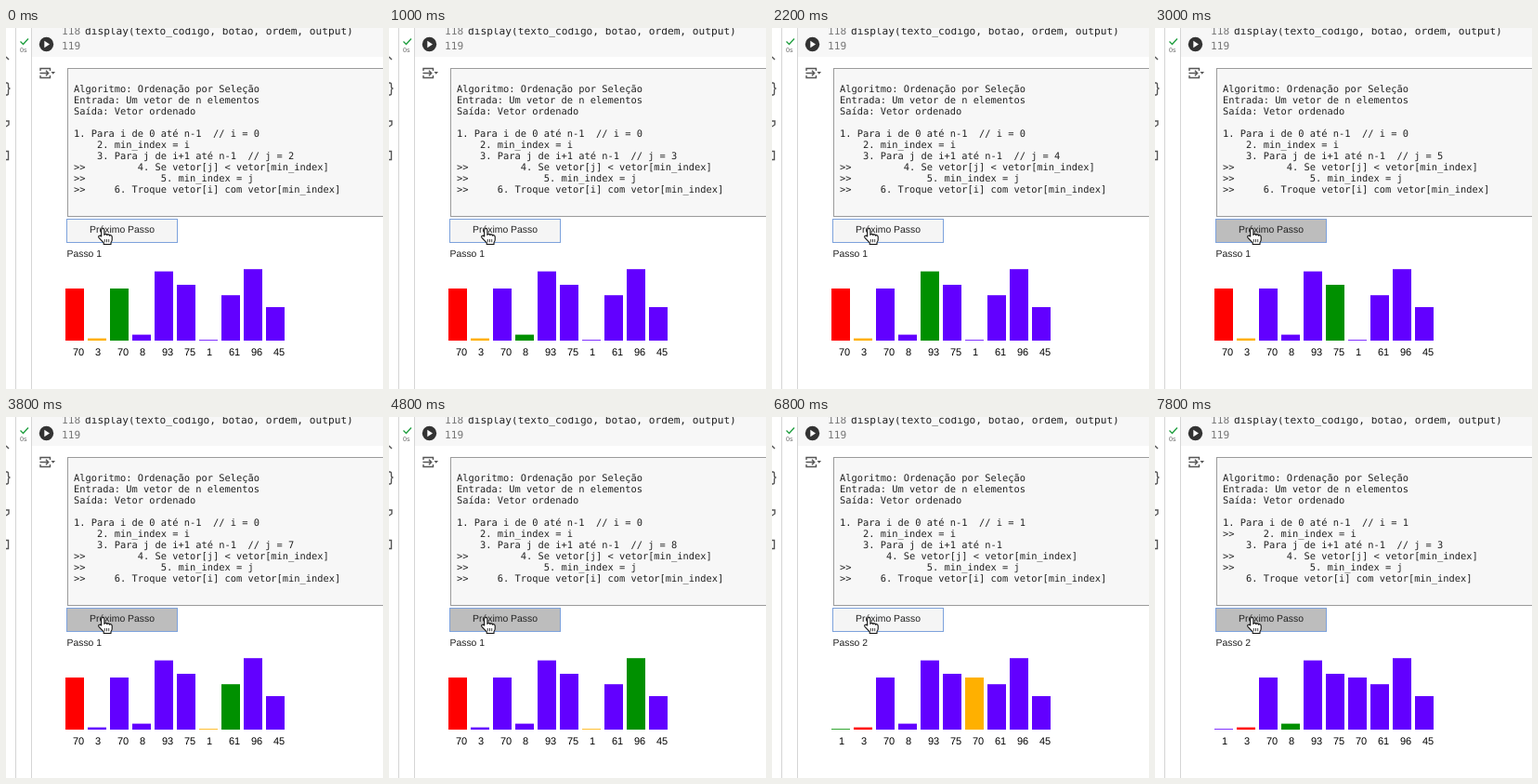
Recreate the animation shown at these times as an HTML page. Size 406 by 388 pixels, loop 8000 ms.

```html
<!DOCTYPE html>
<html lang="pt">
<head>
<meta charset="utf-8">
<title>Ordenação por Seleção</title>
<style>
  html, body { margin: 0; width: 100%; height: 100%; overflow: hidden; background: #fff; }
  svg { display: block; width: 406px; height: 388px; }
  text { white-space: pre; text-rendering: geometricPrecision; }
  .mono { font-family: "DejaVu Sans Mono", monospace; }
  .sans { font-family: "Liberation Sans", Arial, sans-serif; font-size: 10.4px; fill: #212121; }
  .algo { font-size: 10.38px; fill: #212121; }
  .code { font-size: 11.16px; fill: #212121; }
  .number { fill: #777; }
  .label { font-size: 11px; fill: #000; }
  .icon { fill: none; stroke: #555; stroke-width: 1.4; }
</style>
</head>
<body>
<svg viewBox="0 0 406 388">
  <rect x="28" width="378" height="31" fill="#f7f7f7"/>
  <path d="M10.5 0V388M27.5 0V388" stroke="#d5d5d5"/>

  <g class="icon">
    <path d="M0 31l3 3"/>
    <path d="M0 59h1q1.5 0 1.5 2v2q0 2 2 2q-2 0-2 2v3q0 2-1.500 2h-1"/>
    <path d="M0 100h3v4l-3 2"/>
    <path d="M0 132.500h2.500v9h-2.500"/>
  </g>

  <path d="M15.500 14.500l3 3 5.500-6" fill="none" stroke="#1e9e3e" stroke-width="1.3"/>
  <text class="sans" x="15" y="26" style="font-size:7px;fill:#666">0s</text>
  <circle cx="43.500" cy="17.500" r="7.700" fill="#333"/>
  <path d="M41.300 13.800v7.400l5.700-3.700z" fill="#fff"/>
  <text class="mono code number" x="60" y="7">118</text>
  <text class="mono code" x="85" y="7">display(texto_codigo, botao, ordem, output)</text>
  <text class="mono code number" x="60" y="23">119</text>

  <path class="icon" stroke-width="1.200" d="M37 46v-2.500h10.500v2.500M37 51v2.500h10.500v-2.500M36.500 48.500h9M43 45.800l2.700 2.700-2.700 2.700"/>
  <path d="M48.500 47h4.500l-2.250 2.800z" fill="#555"/>

  <rect x="66.500" y="43.500" width="350" height="159" fill="#f7f7f7" stroke="#9b9b9b"/>
  <g id="algo" class="mono algo"></g>

  <rect id="button" x="65.500" y="205.500" width="119" height="25" stroke="#7da2dc"/>
  <text class="sans" x="125" y="220" text-anchor="middle">Próximo Passo</text>
  <g id="output">
    <text id="step" class="sans" x="65.500" y="246"></text>
    <g id="chart"></g>
  </g>

  <path d="M102.700 217.200q0-1.700 1.600-1.700t1.600 1.700v5.300q.2-1.200 1.500-1.100t1.400 1.300q.3-1 1.500-.8t1.300 1.300q.4-.8 1.400-.5t1.200 1.600v3.200q0 1.700-1.200 3v2h-7.800v-1.700l-5-5.200q-1.100-1.500 0-2.200t2.500.6z"
    fill="#fff" stroke="#111" stroke-width="1.100" stroke-linejoin="round"/>
  <path d="M106.300 227v3.300M108.500 227v3.300M110.700 227v3.300" stroke="#111" stroke-width=".8"/>
</svg>

<script>
const LOOP = 8000;
const PURPLE = '#6200ff', GREEN = '#009000', ORANGE = '#ffb000', RED = '#ff0000';
const before = [70, 3, 70, 8, 93, 75, 1, 61, 96, 45];
const after = [1, 3, 70, 8, 93, 75, 70, 61, 96, 45];

// Times at which j reaches 2, 3, 4 ... in the first pass.
const states = [0, 1000, 1800, 2600, 3600, 3800, 4600, 5000, 5400].map((at, k) => ({
  at, i: 0, j: k + 2, min: k < 5 ? 1 : 6, marks: [4, 5, 6], values: before
}));
states.push(
  { at: 6800, i: 1, j: 0, min: 6, marks: [5, 6], values: after },
  { at: 7800, i: 1, j: 3, min: 1, marks: [2, 4, 5], values: after }
);
const presses = [
  [200, 400], [1200, 1400], [2000, 2200], [3000, 3200], [3400, 3600], [3800, 4200],
  [4400, 4600], [4800, 5000], [5200, 5600], [7000, 7200], [7800, 8000]
];
const cleared = [2600, 2800];

const $ = id => document.getElementById(id);
const within = (t, [from, to]) => t >= from && t < to;

function add(parent, tag, attrs) {
  const el = document.createElementNS('http://www.w3.org/2000/svg', tag);
  for (const key in attrs) el.setAttribute(key, attrs[key]);
  return parent.appendChild(el);
}

function algorithm({ i, j, marks }) {
  const steps = [
    `1. Para i de 0 até n-1  // i = ${i}`,
    '    2. min_index = i',
    '    3. Para j de i+1 até n-1' + (j ? `  // j = ${j}` : ''),
    '        4. Se vetor[j] < vetor[min_index]',
    '            5. min_index = j',
    '    6. Troque vetor[i] com vetor[min_index]'
  ].map((line, k) => (marks.includes(k + 1) ? '>> ' : '') + line);
  return ['Algoritmo: Ordenação por Seleção', 'Entrada: Um vetor de n elementos',
    'Saída: Vetor ordenado', '', ...steps];
}

const lines = Array.from({ length: 10 }, (_, k) =>
  add($('algo'), 'text', { x: 73, y: 69 + k * 12.05 }));
const bars = before.map((_, k) => ({
  rect: add($('chart'), 'rect', { x: 64 + 24 * k, width: 20 }),
  label: add($('chart'), 'text', { class: 'sans label', x: 72 + 24 * k, y: 352 })
}));

function show(state) {
  algorithm(state).forEach((line, k) => lines[k].textContent = line);
  $('step').textContent = `Passo ${state.i + 1}`;
  bars.forEach(({ rect, label }, k) => {
    const height = state.values[k] * 0.8;
    rect.setAttribute('y', 336 - height);
    rect.setAttribute('height', height);
    rect.setAttribute('fill',
      k === state.i ? RED : k === state.j ? GREEN : k === state.min ? ORANGE : PURPLE);
    label.textContent = state.values[k];
  });
}

let current;
function frame(now) {
  const t = now % LOOP;
  const state = states.filter(s => s.at <= t).pop();
  if (state !== current) show(current = state);
  $('button').setAttribute('fill', presses.some(p => within(t, p)) ? '#bdbdbd' : '#f5f5f5');
  $('output').setAttribute('visibility', within(t, cleared) ? 'hidden' : 'visible');
}

const start = performance.now();
function tick() {
  frame(performance.now() - start);
  requestAnimationFrame(tick);
}
tick();
</script>
</body>
</html>
```
